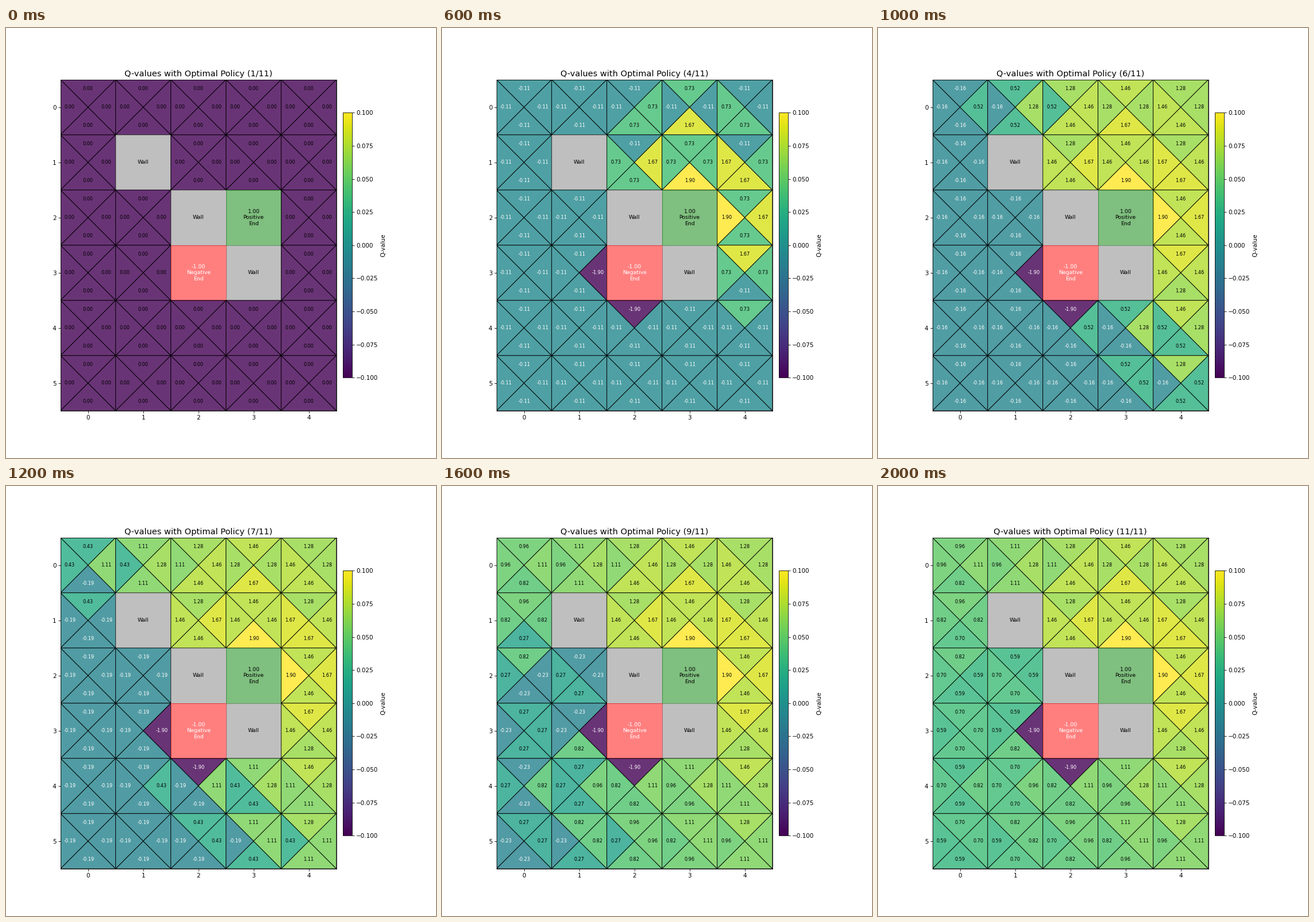
These frames come from a looping animation (748 by 748 pixels, 2200 ms). A matplotlib script:

```python
import numpy as np
import matplotlib.pyplot as plt
from matplotlib.animation import FuncAnimation
from matplotlib.cm import ScalarMappable
from matplotlib.colors import Normalize
from matplotlib.patches import Polygon, Rectangle

ROWS, COLS = 6, 5
STEPS = 11
GAMMA, STEP_REWARD = 0.9, -0.04
WALLS = {(1, 1), (2, 2), (3, 3)}
ENDS = {(2, 3): 1.0, (3, 2): -1.0}
MOVES = [(-1, 0), (1, 0), (0, -1), (0, 1)]  # up, down, left, right
CELLS = [(r, c) for r in range(ROWS) for c in range(COLS)]
OPEN = [s for s in CELLS if s not in WALLS and s not in ENDS]


def step(cell, move):
    """Neighbour in the given direction, or the same cell if blocked."""
    r, c = cell[0] + move[0], cell[1] + move[1]
    inside = 0 <= r < ROWS and 0 <= c < COLS
    return (r, c) if inside and (r, c) not in WALLS else cell


def iterate_values():
    """Synchronous value iteration, returning the Q table of every sweep."""
    values = {s: 0.0 for s in CELLS}
    history = [{s: [0.0] * 4 for s in OPEN}]
    for _ in range(STEPS - 1):
        q = {}
        for s in OPEN:
            targets = [step(s, m) for m in MOVES]
            q[s] = [ENDS.get(t, STEP_REWARD) + GAMMA * values[t] for t in targets]
        history.append(q)
        values = {s: max(q[s]) for s in OPEN} | ENDS
    return history


def triangle(cell, move):
    """Corners of the quarter of a cell that faces the move."""
    r, c = cell
    dr, dc = move
    ends = [(c + dc / 2 + k * dr / 2, r + dr / 2 + k * dc / 2) for k in (-1, 1)]
    return [(c, r)] + ends


def label(x, y, text, size, color="black"):
    return ax.text(x, y, text, ha="center", va="center", fontsize=size, color=color)


def block(cell, color, text, text_color="black"):
    r, c = cell
    ax.add_patch(Rectangle((c - 0.5, r - 0.5), 1, 1, color=color, alpha=0.5))
    label(c, r, text, 9, text_color)


history = iterate_values()
cmap = plt.get_cmap("viridis")

fig, ax = plt.subplots(figsize=(10, 10), dpi=74.8)
ax.set_xlim(-0.5, COLS - 0.5)
ax.set_ylim(ROWS - 0.5, -0.5)
ax.set_aspect("equal")
ax.set_xticks(range(COLS))
ax.set_yticks(range(ROWS))
title = ax.set_title("", fontsize=14)

parts = {}
for cell in CELLS:
    if cell in WALLS:
        block(cell, "gray", "Wall")
    elif cell in ENDS:
        reward = ENDS[cell]
        if reward > 0:
            block(cell, "green", f"{reward:.2f}\nPositive\nEnd")
        else:
            block(cell, "red", f"{reward:.2f}\nNegative\nEnd", "white")
    else:
        for i, move in enumerate(MOVES):
            corners = triangle(cell, move)
            patch = Polygon(corners, closed=True, edgecolor="black", alpha=0.8)
            ax.add_patch(patch)
            x, y = np.mean(corners, axis=0)
            parts[cell, i] = patch, label(x, y, "", 8)

scale = ScalarMappable(norm=Normalize(-0.1, 0.1), cmap=cmap)
fig.colorbar(scale, ax=ax, label="Q-value", fraction=0.15, pad=0.02,
             shrink=0.8, aspect=30)


def update(frame):
    table = history[frame]
    flat = [v for qs in table.values() for v in qs]
    norm = Normalize(min(flat), max(flat))
    for (cell, i), (patch, text) in parts.items():
        q = table[cell][i]
        patch.set_facecolor(cmap(float(norm(q))))
        text.set_text(f"{q:.2f}")
        text.set_color("white" if q < 0 else "black")
    title.set_text(f"Q-values with Optimal Policy ({frame + 1}/{STEPS})")
    return []


anim = FuncAnimation(fig, update, frames=STEPS, interval=200,
                     repeat=True, repeat_delay=0, blit=False)
plt.show()
```
